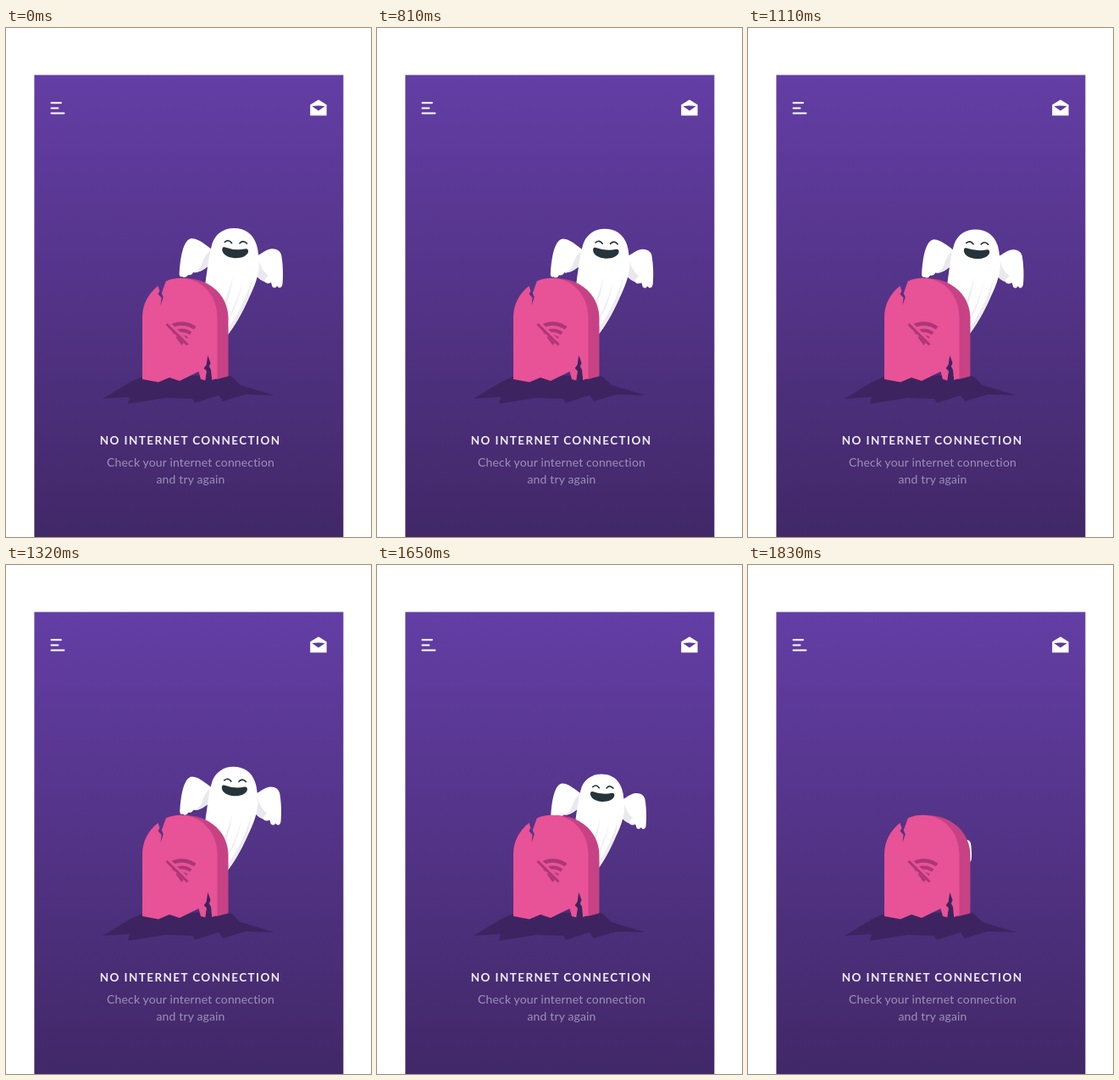
Recreate the animation shown at these times as an HTML page. Size 431x600 px, loop 2.25 s.

```html
<!DOCTYPE html>
<html lang="en">
<head>
<meta charset="utf-8">
<title>No internet connection</title>
<style>
  html, body { margin: 0; width: 100%; height: 100%; overflow: hidden; background: #fff; }
  svg { display: block; width: 431px; height: 600px; }
  text { font-family: Lato, "Open Sans", sans-serif; text-anchor: middle; fill: #fff; }
  .title { font-size: 13.5px; font-weight: 700; letter-spacing: 1.4px; fill: #f1ecf8; }
  .note { font-size: 14px; letter-spacing: .15px; fill-opacity: .48; }
</style>
</head>
<body>
<svg viewBox="0 0 431 600">
  <defs>
    <linearGradient id="sky" x1="0" y1="0" x2="0" y2="1">
      <stop offset="0" stop-color="#633ea5"/>
      <stop offset="1" stop-color="#412867"/>
    </linearGradient>
    <clipPath id="fan"><path d="M207.5 374 L187 346 V338 H229 V346 Z"/></clipPath>
  </defs>

  <rect x="33.4" y="55.4" width="365" height="545" fill="url(#sky)"/>

  <!-- menu and mail -->
  <path d="M53.5 88.3H65 M53.5 94.4H61.5 M53.5 100.5H68.5" stroke="#fff" stroke-width="2" stroke-linecap="round"/>
  <path d="M369 84.6 L378.6 90.4 V103.2 H359.2 V90.4 Z" fill="#fff"/>
  <path d="M361.4 92.2 Q369 90.8 376.6 92.2 L369 97.4 Z" fill="#5f3b9d"/>

  <!-- ground -->
  <path d="M114 437 L147 417 L161 411 L262 409 L268 412 L277 421 L317 433 L283 432 L256 440 L251 433 L223 442 L220 437 L188 436 L144 443 L146 435 Z" fill="#3d2460"/>

  <g id="ghost">
    <path d="M243 261 C235 255 227 248 219 248 C211 249 206 264 204.6 290 Q205 294 208 293 L210 294 Q213 294.5 215 291 Q219 292 221 288 C228 289 235 284 241 279 Z" fill="#fff"/>
    <path d="M221 288 C228 289 235 284 240 279 L241 263 C236 266 233 273 231 280 Q227 287 221 288 Z" fill="#e8e8ee"/>
    <path d="M294 269 C300 268 305 262 312 260.5 Q322 259 325 267 C327 277 327.5 290 326.6 301 Q326 307 322 306 L320 304 Q318 308 314.500 305 L313 300 Q308 303 304 298 Q299 297 293 289 Z" fill="#fff"/>
    <path d="M297 268 C299 277 302 286 310 292 Q306 294 305 299 Q299 297 293 289 Z" fill="#e8e8ee"/>
    <path d="M269 236 C256 236 246 244 243 256 C239 270 238 284 236 296 C233 318 231 342 228 358 L244 369 L260 364 C269 353 278 337 286 320 C293 306 299 291 299 278 C298 269 298 262 296 256 C292 243 283 236 269 236 Z" fill="#fff"/>
    <path d="M292 291 C285 315 274 339 261 355 L260 364 C270 352 279 336 286 320 Z M268 292 Q264 310 257 325 L260 325 Q266 310 268 292 Z M279 299 Q273 324 262 342 L265 340 Q275 323 279 299 Z" fill="#ececf1"/>
    <path d="M258.300 252.300 Q263 248.500 266.500 253.600 M276 253.800 Q280 249.300 284.500 254" fill="none" stroke="#26333a" stroke-width="1.700" stroke-linecap="round"/>
    <path d="M258 258.200 Q271 263 283 260.200 Q286.500 260 286 264 C284.500 269 278 271.500 270 271.200 C262 270.700 256 267 255.300 262 Q255 257.600 258 258.200 Z" fill="#26333a"/>
  </g>

  <!-- tombstone -->
  <path d="M206 295 H213 C241 296 262 315 262.500 342 V410.500 L249 414 L220 400 Z" fill="#c74284"/>
  <path d="M161 414 V341 C161 326 168 313 179.500 304 L181.500 310 L179.500 313.500 L183.600 318 L182.500 327 L185.800 317.500 L183.800 312.500 L188.800 298.500 C194 296 200 294.800 206 294.800 C231 295 249.500 315 249.500 341 V413 L243 415 L242 403 L239.800 399 L241.500 395 L238.300 386 L236.700 397 L233.800 401 L237 404.500 L235.500 415.500 L230 414 L227.500 405 L205 416 L193 412 L180 417.500 Z" fill="#e85297"/>
  <path d="M238.300 386 L241.500 395 L239.800 399 L242 403 L243 415 H235.500 L237 404.500 L233.800 401 L236.700 397 Z" fill="#3d2460"/>

  <!-- offline mark -->
  <g fill="none" stroke="#ac3776">
    <g clip-path="url(#fan)">
      <circle cx="207.500" cy="374" r="25.500" stroke-width="4.500"/>
      <circle cx="207.500" cy="374" r="17.500" stroke-width="4"/>
      <circle cx="207.500" cy="374" r="6" stroke-width="12"/>
    </g>
    <path d="M189 346.500 L216 373" stroke="#e85297" stroke-width="6"/>
    <path d="M189.500 349 L214.500 373.500" stroke-width="3"/>
  </g>

  <text class="title" x="217.700" y="491.300">NO INTERNET CONNECTION</text>
  <text class="note" x="218" y="516.500">Check your internet connection</text>
  <text class="note" x="218" y="536.700">and try again</text>
</svg>
<script>
  const LOOP = 2250, DRIFT = 810, DIVE = 1560, HIDE = 1830;
  const ghost = document.getElementById("ghost");
  const clamp = v => Math.max(0, Math.min(1, v));

  function draw(t) {
    // slow shrink, then an accelerating dive behind the stone
    const d = t < DRIFT ? 0 : 0.3 + 0.7 * clamp((t - DRIFT) / (DIVE - DRIFT));
    const k = clamp((t - DIVE) / (HIDE - DIVE));
    const x = 269 - d - 37 * k ** 2.2;
    const y = 236 + 2.4 * d + 71.6 * k ** 2;
    const s = 1 - 0.028 * d - 0.402 * k ** 1.9;
    ghost.setAttribute("transform", `translate(${x} ${y}) scale(${s}) translate(-269 -236)`);
  }

  const start = performance.now();
  function tick() {
    draw((performance.now() - start) % LOOP);
    requestAnimationFrame(tick);
  }
  draw(0);
  requestAnimationFrame(tick);
</script>
</body>
</html>
```
